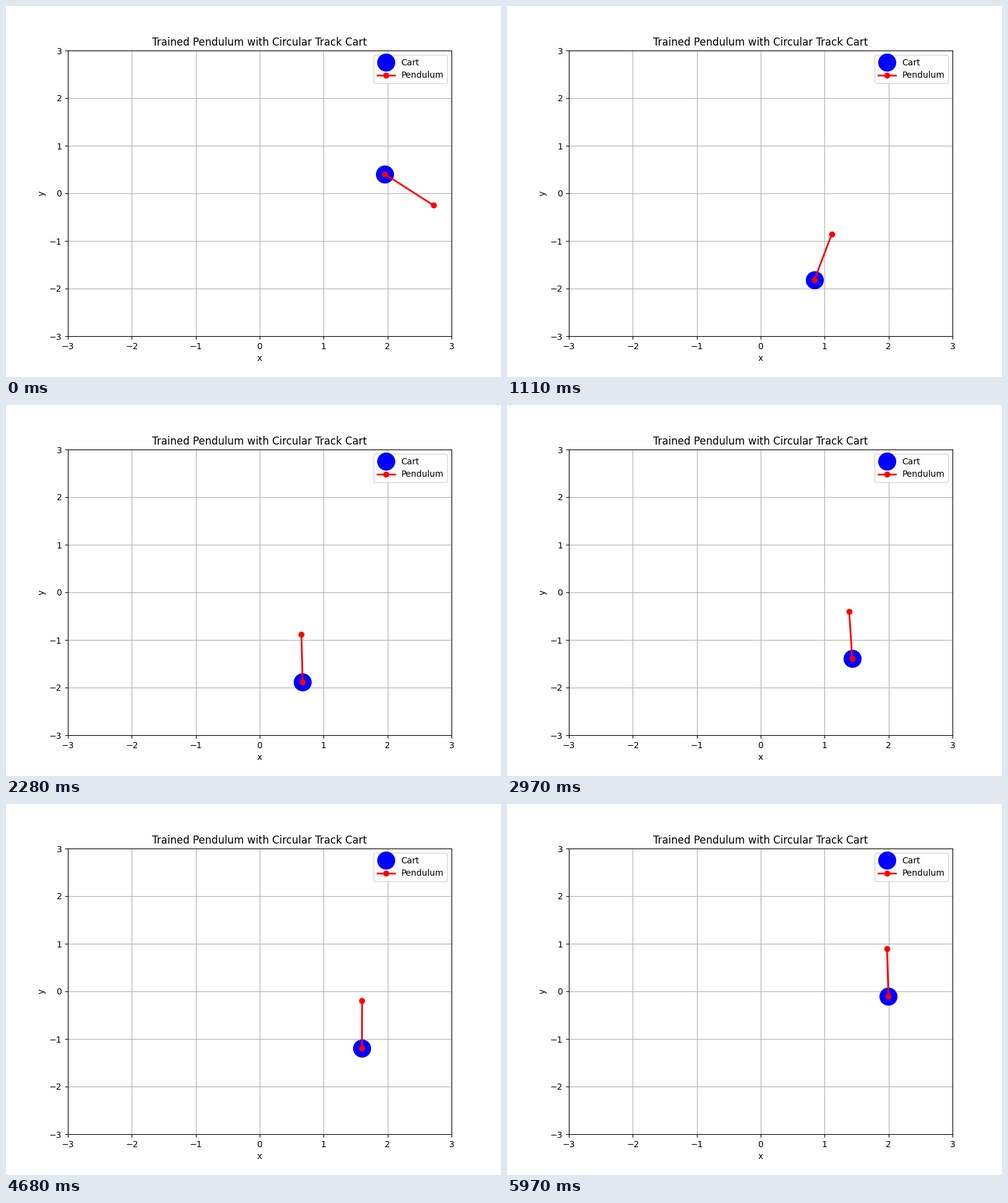
Recreate the animation shown at these times as a matplotlib script. Size 800 by 600 pixels, loop 6 s.

```python
import numpy as np
import matplotlib.pyplot as plt
from matplotlib.animation import FuncAnimation

FRAMES, INTERVAL = 200, 30
TRACK, ROD = 2.0, 1.0
PERIOD, PEAK = 13.0, 189.3   # cart rocking while it balances
CATCH = 52.8                 # the rod stands upright from here on


def ease(t, keys, smooth):
    """Hermite curve through (time, value) keys, flat at both ends."""
    xs, ys = np.array(keys, float).T
    slope = np.gradient(ys, xs) if smooth else np.zeros_like(xs)
    slope[[0, -1]] = 0
    i = np.clip(np.searchsorted(xs, t, side="right") - 1, 0, len(xs) - 2)
    h = xs[i + 1] - xs[i]
    u = np.clip((t - xs[i]) / h, 0, 1)
    s = u * u * (3 - 2 * u)
    bend = h * u * (1 - u) * ((1 - u) * slope[i] - u * slope[i + 1])
    return ys[i] + s * (ys[i + 1] - ys[i]) + bend


def triangle(phase):
    return 4 * np.abs(phase % 1 - 0.5) - 1


t = np.arange(FRAMES)

# Balancing: constant-speed rocking on a slow drift, the rod leaning against it.
rock = triangle((t - PEAK) / PERIOD)
cart_hold = -108.9 + 0.534 * t + 15 * rock
rod_hold = 181.3 + 1.9 * rock

# Swing-up: the cart darts back and forth and throws the rod over.
cart_swing = ease(t, [(0, 11.6), (13, 135), (29, -37), (46, -98.6),
                      (CATCH, -95.7)], smooth=False)
rod_swing = ease(t, [(0, 49.3), (13, -33), (17, -48), (21, -37.2),
                     (27, 72), (46, 180)], smooth=True)

theta = np.radians(np.where(t < CATCH, cart_swing, cart_hold))
phi = np.radians(np.where(t < CATCH, rod_swing, rod_hold))
cart_x, cart_y = TRACK * np.cos(theta), TRACK * np.sin(theta)
tip_x, tip_y = cart_x + ROD * np.sin(phi), cart_y - ROD * np.cos(phi)

fig, ax = plt.subplots(figsize=(8, 6), dpi=100)
ax.set(xlim=(-3, 3), ylim=(-3, 3), xlabel="x", ylabel="y",
       title="Trained Pendulum with Circular Track Cart")
ax.grid(True)
cart, = ax.plot([], [], "bo", markersize=20, label="Cart")
rod, = ax.plot([], [], "ro-", lw=2, label="Pendulum")
ax.legend(loc="upper right")


def update(k):
    cart.set_data([cart_x[k]], [cart_y[k]])
    rod.set_data([cart_x[k], tip_x[k]], [cart_y[k], tip_y[k]])
    return cart, rod


anim = FuncAnimation(fig, update, frames=FRAMES, interval=INTERVAL, repeat=True)
plt.show()
```
